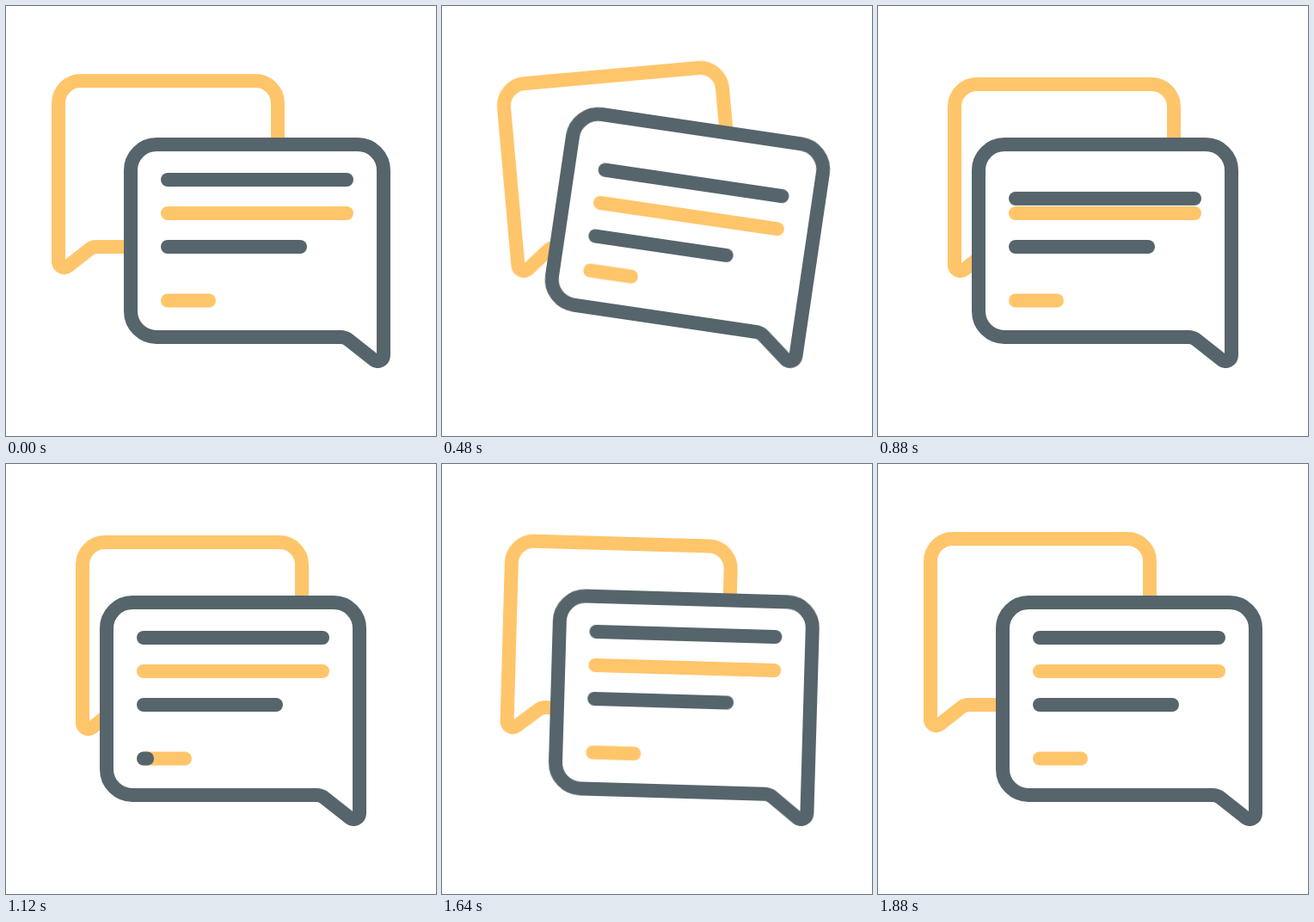
These frames come from a looping animation (500 px wide and 500 px high, 2 s). An HTML page without scripts:

```html
<!DOCTYPE html>
<html lang="en">
<head>
<meta charset="utf-8">
<title>Chat bubbles</title>
<style>
  html, body { margin: 0; width: 100%; height: 100%; overflow: hidden; background: #fff; }
  svg { display: block; width: 100%; height: 100%; }

  path {
    fill: #fff;
    stroke-width: 16;
    stroke-linecap: round;
    stroke-linejoin: round;
  }
  .dark { stroke: #56646c; }
  .gold { stroke: #ffc56a; }

  g, .row, .sweep { animation: 2s ease-in-out infinite; }

  /* Each bubble slides as a whole and swings around its tail tip */
  .back { animation-name: back-slide; }
  .front { animation-name: front-slide; }
  .back .swing { animation-name: back-swing; transform-origin: 68px 298px; }
  .front .swing { animation-name: front-swing; transform-origin: 432px 406px; }

  @keyframes back-slide {
    0%, 6%, 92.3%, 100% { transform: translate(0, 0); }
    26%, 72.3% { transform: translate(28px, 4px); }
  }
  @keyframes front-slide {
    0%, 6%, 92.3%, 100% { transform: translate(0, 0); }
    26%, 72.3% { transform: translate(-28px, 0); }
  }
  @keyframes back-swing {
    0%, 4%, 34%, 67%, 94%, 100% { transform: rotate(0deg); }
    14%, 86.7% { transform: rotate(6.9deg); }
    24%, 76.7% { transform: rotate(-5.1deg); }
  }
  @keyframes front-swing {
    0%, 4%, 34%, 67%, 94%, 100% { transform: rotate(0deg); }
    12.5%, 87% { transform: rotate(-4.8deg); }
    24%, 77% { transform: rotate(8.4deg); }
  }

  /* Text rows drop one after another, then rise in reverse order */
  .r1 { animation-name: row1; }
  .r2 { animation-name: row2; }
  .r3 { animation-name: row3; }

  @keyframes row1 {
    0%, 4%, 53%, 100% { transform: translateY(0); }
    14%, 43% { transform: translateY(22.4px); }
  }
  @keyframes row2 {
    0%, 11%, 42%, 100% { transform: translateY(0); }
    21%, 31.5% { transform: translateY(22px); }
  }
  @keyframes row3 {
    0%, 14%, 34%, 100% { transform: translateY(0); }
    24% { transform: translateY(22px); }
  }

  /* Dark stroke runs over the short row and back */
  .sweep { animation-name: sweep, blink; stroke-dasharray: 48 80; }

  @keyframes sweep {
    0%, 54%, 75%, 100% { stroke-dashoffset: 48; }
    64%, 66% { stroke-dashoffset: 0; }
  }
  @keyframes blink {
    0%, 53.99%, 75%, 100% { opacity: 0; }
    54%, 74.99% { opacity: 1; }
  }
</style>
</head>
<body>
<svg viewBox="0 0 500 500">
  <g class="back">
    <g class="swing">
      <path class="gold" d="M61 298V113a26 26 0 0 1 26-26H290a26 26 0 0 1 26 26V254a26 26 0 0 1-26 26H105q-4 0-7.5 2.5L72.2 302.6A7 7 0 0 1 61 298Z"/>
    </g>
  </g>
  <g class="front">
    <g class="swing">
      <path class="dark" d="M439 406V191a30 30 0 0 0-30-30H175a30 30 0 0 0-30 30V355a30 30 0 0 0 30 30H389q5 0 9 3L427.8 411.6A7 7 0 0 0 439 406Z"/>
      <path class="row r1 dark" d="M188 202H396"/>
      <path class="row r2 gold" d="M188 241H396"/>
      <path class="row r3 dark" d="M188 280H342"/>
      <path class="gold" d="M188 342.5H236"/>
      <path class="sweep dark" d="M188 342.5H236"/>
    </g>
  </g>
</svg>
</body>
</html>
```
